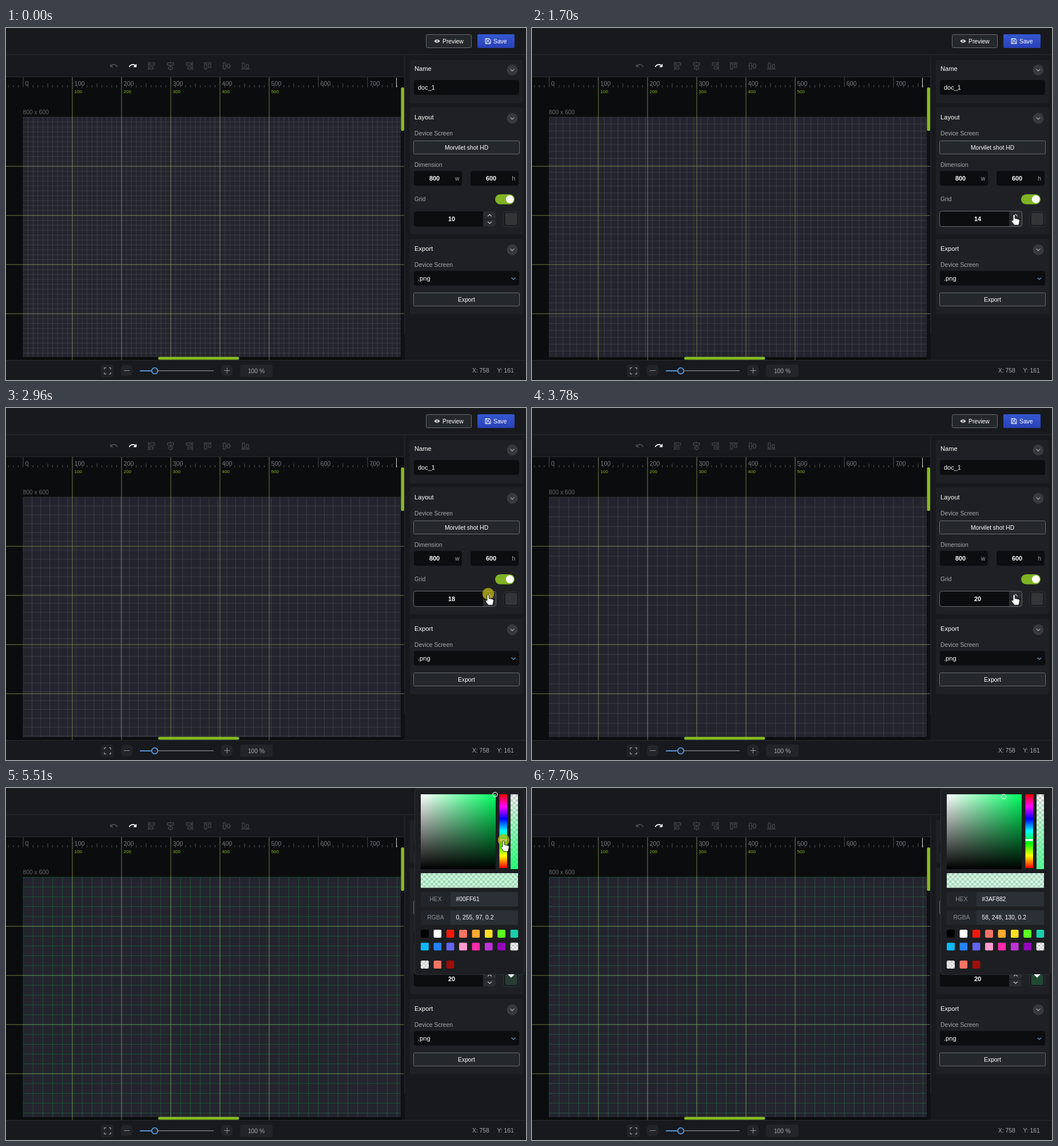
Write an HTML page with a canvas that moves like this. It is 909 px wide and 616 px high and loops after 8 s.

```html
<!DOCTYPE html>
<html lang="en">
<head>
<meta charset="utf-8">
<title>Grid settings</title>
<style>
html, body { margin: 0; width: 100%; height: 100%; overflow: hidden; background: #18191d; }
canvas { display: block; }
</style>
</head>
<body>
<canvas id="stage" width="909" height="616"></canvas>
<script>
const c = document.getElementById('stage').getContext('2d');
const LOOP = 8000, FONT = '"Liberation Sans", Arial, sans-serif';
const LIME = '#86bb22', EDGE = '#696c6f', FIELD = '#0c0d0e', GUIDE = '#707848';
const UNIT = 0.86, LEFT = 30, TOP = 156, WIDTH = 660, HEIGHT = 420;

// Timeline (ms)
const steps = [1100, 1300, 1500, 1700, 1900, 2100, 2430, 2640, 3110, 3780];
const presses = [960, 1240, 1430, 1560, 1760, 1960, 2290, 2500, 2960, 3710];
const OPEN = 4400, HUE_PICK = 5380, SHADE_PICK = 6050;
const pointerKeys = [[70, 852, 541], [470, 843, 325], [3800, 843, 325], [4250, 879, 331],
  [4620, 879, 331], [5300, 870, 91], [5720, 870, 91], [6050, 836, 32]];
const shadeKeys = [[6050, .85, .84], [6450, .6, .74], [6940, .64, .87], [7300, .72, 1], [7700, .766, .973]];

const clamp = v => Math.max(0, Math.min(1, v));
const mix = (a, b, k) => a + (b - a) * k;
const rgba = (col, a = 1) => `rgba(${col.map(Math.round)},${a})`;

function along(keys, t) {
  let i = 0;
  while (i < keys.length - 2 && t >= keys[i + 1][0]) i++;
  const a = keys[i], b = keys[i + 1];
  const k = clamp((t - a[0]) / (b[0] - a[0])), e = k * k * (3 - 2 * k);
  return [mix(a[1], b[1], e), mix(a[2], b[2], e)];
}

function rect(x, y, w, h, fill) { c.fillStyle = fill; c.fillRect(x, y, w, h); }

function box(x, y, w, h, r, fill, stroke) {
  c.beginPath();
  c.roundRect(x, y, w, h, r);
  if (fill) { c.fillStyle = fill; c.fill(); }
  if (stroke) { c.strokeStyle = stroke; c.lineWidth = 1; c.stroke(); }
}

function disc(x, y, r, fill, stroke, width = 1) {
  c.beginPath();
  c.arc(x, y, r, 0, 7);
  if (fill) { c.fillStyle = fill; c.fill(); }
  if (stroke) { c.strokeStyle = stroke; c.lineWidth = width; c.stroke(); }
}

function icon(d, x, y, stroke, fill, width = 1) {
  const p = new Path2D(d);
  c.save();
  c.translate(x, y);
  if (fill) { c.fillStyle = fill; c.fill(p); }
  if (stroke) { c.strokeStyle = stroke; c.lineWidth = width; c.stroke(p); }
  c.restore();
}

// y is the middle of the capitals
function text(s, x, y, color, size = 10.32, align = 'left', weight = '') {
  c.font = `${weight} ${size}px ${FONT}`;
  c.textAlign = align;
  c.fillStyle = color;
  c.fillText(s, x, y + size * .36);
}

function gradient(x0, y0, x1, y1, colors) {
  const g = c.createLinearGradient(x0, y0, x1, y1);
  colors.forEach((col, i) => g.addColorStop(i / (colors.length - 1), col));
  return g;
}

function checker(x, y, w, h, size) {
  rect(x, y, w, h, '#fff');
  c.fillStyle = '#c9c9c9';
  for (let j = 0; j * size < h; j++)
    for (let i = j % 2; i * size < w; i += 2)
      c.fillRect(x + i * size, y + j * size, Math.min(size, w - i * size), Math.min(size, h - j * size));
}

const chevron = (x, y, color, up = 1) => icon(`M-3.5 ${-1.7 * up}L0 ${1.7 * up}L3.5 ${-1.7 * up}`, x, y, color, null, 1.1);

function drawWorkspace(size, color) {
  rect(0, 86, 697, 495, '#0b0c0d');
  rect(690, 104, 7, 477, '#101112');
  rect(LEFT, TOP, WIDTH, HEIGHT, '#24242e');
  text('800 x 600', 29.5, 147.5, '#66686c');

  for (let n = 1; n < 6; n++) {
    const d = 86 * n;
    rect(LEFT + d - .5, 86, 1, 495, GUIDE);
    if (n < 5) rect(0, TOP + d - .5, 696, 1, GUIDE);
    text(100 * n, LEFT + d + 3.5, 111.5, LIME, 8);
  }

  c.fillStyle = rgba(color, .2);
  const gap = size * UNIT;
  for (let x = 0; x < WIDTH; x += gap) c.fillRect(LEFT + x - .5, TOP, 1, HEIGHT);
  for (let y = 0; y < HEIGHT; y += gap) c.fillRect(LEFT, TOP + y - .5, WIDTH, 1);

  for (let n = -3; n <= 76; n++) {
    const x = LEFT + n * 8.6 - .5, h = n % 10 ? (n % 5 ? 4 : 7) : 18;
    rect(x, 104 - h, 1, h, n % 10 ? '#505256' : '#484a4e');
    if (n >= 0 && n % 10 == 0) text(n * 10, x + 4, 97, '#77797d', 10.7);
  }
  rect(0, 85, 697, 1, '#292b30');
  rect(682, 87, 1, 17, '#d4d4d4');
  box(690.5, 104, 5.5, 76, 2, LIME);
  box(266, 575.5, 141.5, 5, 2.5, LIME);
}

function drawBars() {
  rect(0, 46, 909, 1, '#292b30');
  box(734.5, 11.5, 79, 23, 2, '#25282b', EDGE);
  icon('M-5 0Q0-6 5 0Q0 6-5 0Z', 753.5, 23, null, '#fff');
  disc(753.5, 23, 1.9, '#25282b');
  disc(753.5, 23, .9, '#fff');
  text('Preview', 763, 23, '#fff');
  box(824, 11, 65, 24, 2, gradient(0, 11, 0, 35, ['#3458d0', '#2a40b6']));
  icon('M-4.5-4.5H2.5L4.5-2.5V4.5H-4.5ZM-2.5-4.5V-1.5H1.8V-4.5M-2.5 4.5V1H2.5V4.5', 842.5, 23, '#fff');
  text('Save', 852, 23, '#fff');

  const gray = '#505358';
  [[188.5, 1, '#484b50'], [221.5, -1, '#fff']].forEach(([x, flip, color]) => {
    c.save();
    c.translate(x, 65.5);
    c.scale(flip, 1);
    icon('M-6.7-3V3H-.8Z', 0, 0, null, color);
    icon('M-4.6 .4C-1.5-3 4.6-1.8 6 2.8', 0, 0, color, null, 1.6);
    c.restore();
  });
  const sides = 'M-5.5-7.5V7.5M-3.5-5.5H5.5V-1.5H-3.5ZM-3.5 1.5H2.5V5.5H-3.5Z';
  const middle = 'M0-7.5V-5.5M0-1.5V1.5M0 5.5V7.5M-5.5-5.5H5.5V-1.5H-5.5ZM-3.5 1.5H3.5V5.5H-3.5Z';
  [[254, 0, 0, 1], [287, 1, 0, 1], [320, 0, 0, -1], [352, 0, 1, 1], [385, 1, 1, 1], [418, 0, 1, -1]]
    .forEach(([x, centered, turn, flip]) => {
      c.save();
      c.translate(x + .5, 66.5);
      if (turn) c.transform(0, 1, 1, 0, 0, 0);
      c.scale(flip, 1);
      icon(centered ? middle : sides, 0, 0, gray);
      c.restore();
    });

  rect(0, 581, 909, 1, '#292b30');
  box(166, 589, 22, 22, 3, '#202226');
  icon('M-5.5-2.5V-5.5H-2.5M2.5-5.5H5.5V-2.5M5.5 2.5V5.5H2.5M-2.5 5.5H-5.5V2.5', 177.5, 600, '#a4a6aa', null, 1.2);
  box(201, 589.5, 20, 20, 6, '#222428');
  box(376, 589.5, 20, 20, 6, '#222428');
  icon('M-5 0H5', 211, 599.5, '#96989c');
  icon('M-5 0H5M0-5V5', 386.5, 599.5, '#96989c');
  rect(234, 599, 26, 2, '#5794d6');
  rect(260, 599, 103, 1.5, '#74777b');
  disc(260, 600, 5.3, '#202329', '#5794d6', 1.8);
  box(409.5, 589, 56.5, 21.5, 3, '#222428');
  text('100 %', 437.5, 600, '#a9abaf', 10.32, 'center');
  text('X: 758', 815, 599, '#a9abaf');
  text('Y: 161', 858.5, 599, '#a9abaf');
}

function card(title, y, h, titleY) {
  box(706, y, 198, h, 4, '#1f2023');
  text(title, 714, titleY, '#fff', 11.18);
  disc(885, titleY + 2.5, 9.5, '#37393d');
  chevron(885, titleY + 2.5, '#a9abaf');
}

function button(label, y) {
  box(712.5, y, 185, 23, 2, '#25282b', EDGE);
  text(label, 805, y + 11.5, '#fff', 10.32, 'center');
}

function drawPanel(size, hover, swatch) {
  const label = '#a6a8ab';
  rect(696, 48, 2, 487, '#1f202b');
  card('Name', 56, 76, 71);
  box(713, 91, 184, 26, 4, FIELD);
  text('doc_1', 720, 104, '#fff', 11);

  card('Layout', 139, 222, 155.5);
  text('Device Screen', 714, 184, label);
  button('Morvilet shot HD', 197.5);
  text('Dimension', 714, 239, label);
  box(713, 250, 84, 26, 4, FIELD);
  box(812, 250, 84, 26, 4, FIELD);
  text('800', 749, 263, '#fff', 10.9, 'center', 'bold');
  text('600', 848, 263, '#fff', 10.9, 'center', 'bold');
  text('w', 785, 263.5, label);
  text('h', 884.5, 263, label);
  text('Grid', 714, 299, label);
  box(855, 291, 34, 17.5, 8.75, '#7fb324');
  disc(880.7, 299.7, 6.9, '#fff');

  box(713, 321, 143, 26.5, 4, FIELD);
  box(834, 321, 22, 13, [0, 4, 0, 0], '#2a2c2f');
  box(834, 334.7, 22, 12.8, [0, 0, 4, 0], '#2a2c2f');
  chevron(845.5, 328, '#d0d2d4', -1);
  chevron(845.5, 340.5, '#d0d2d4');
  if (hover) box(712.5, 320.5, 144, 27, 4, null, EDGE);
  text(size, 779, 334.5, '#fff', 11, 'center', 'bold');
  box(869.5, 321.5, 27, 26, 4, '#1b1c1f', '#303236');
  box(873, 323.5, 20.5, 21, 3, rgba(swatch, .2));

  card('Export', 369, 132, 385.5);
  text('Device Screen', 714, 414, label);
  box(713, 425, 184, 25.5, 4, FIELD);
  text('.png', 720, 438, '#fff', 11.18);
  chevron(887, 438.5, '#6aa5e0');
  button('Export', 463.5);
}

const palette = ['#000', '#fff', '#f5190b', '#f47564', '#ffab30', '#ffde24', '#5dff1f', '#18cfad',
  '#0cb8f5', '#2483f5', '#6462f0', '#ff9bcf', '#ff2ba9', '#be33d8', '#9207b8', null,
  null, '#f47564', '#9d0f0a'];

function drawPicker(color, s, v, picked) {
  box(714.5, 1.5, 192, 325, 3, '#1c1e21', '#2e3034');

  rect(725, 11, 131, 131, picked ? '#00ff61' : '#777');
  rect(725, 11, 131, 131, gradient(725, 0, 856, 0, ['#fff', 'rgba(255,255,255,0)']));
  rect(725, 11, 131, 131, gradient(0, 11, 0, 142, ['rgba(0,0,0,0)', '#000']));
  disc(725 + s * 130, 11.5 + (1 - v) * 130, 4, null, '#fff', 1.2);

  rect(862.5, 11, 13.5, 129, gradient(0, 11, 0, 140, ['#f00', '#f0f', '#00f', '#0ff', '#0f0', '#ff0', '#f00']));
  rect(862.5, picked ? 89.5 : 140, 13.5, 3, '#fff');
  checker(882, 11, 13, 131, 4.3);
  rect(882, 11, 13, 131, gradient(0, 11, 0, 142, [rgba(color, 0), rgba(color, .85)]));
  checker(725, 149, 170, 25.5, 4.3);
  rect(725, 149, 170, 25.5, rgba(color, .2));

  const hex = '#' + color.map(n => n.toString(16).padStart(2, '0')).join('').toUpperCase();
  [['HEX', hex, 182], ['RGBA', [...color, .2].join(', '), 214]].forEach(([name, value, y]) => {
    rect(725, y, 52, 25.5, '#22252a');
    rect(777, y, 118, 25.5, '#2b2f36');
    text(name, 751, y + 12.5, '#8d9095', 10.32, 'center');
    text(value, 786.5, y + 12.5, '#fff');
  });

  palette.forEach((fill, i) => {
    const x = 725 + i % 8 * 22.35, y = [248, 270.5, 302][i >> 3];
    c.save();
    c.beginPath();
    c.roundRect(x, y, 14, 14, 2.5);
    c.clip();
    if (fill) rect(x, y, 14, 14, fill);
    else checker(x, y, 14, 14, 3.5);
    c.restore();
  });
  icon('M-6 0H6L0 6Z', 883, 326, null, '#fff');
}

const HAND = 'M-2 11V2.2a1.6 1.6 0 0 1 3.2 0V7.2L7.6 8.6Q9.6 9.2 9.4 11.2L8.6 15.5L7.6 19H.4L-4.6 13Q-5.4 11.4-3.9 10.6Q-2.8 10.3-2 11Z';
const ARROW = 'M0 0V15L3.6 11.7L6 17L8.3 16L6 10.8H10.8Z';

function drawPointer(t) {
  if (t < 70 || t > 6100) return;
  const [x, y] = along(pointerKeys, t);
  const i = steps.findIndex(s => t < s);
  const pressed = i >= 0 && t >= presses[i] || t >= 4320 && t < 4390 || t >= 5330 && t < 5650;
  if (pressed) disc(x, y, 10.3, 'rgba(190,180,20,.75)');
  const hand = t > 400 && (t < 3900 || t > 4080);
  icon(hand ? HAND : ARROW, x, y + 1, '#111', '#fff', .9);
}

function colorAt(s, v) {
  const max = v * 255, min = max * (1 - s);
  return [min, max, mix(min, max, 97 / 255)].map(Math.round);
}

function draw(t) {
  const size = 10 + steps.filter(s => t >= s).length;
  const picked = t >= HUE_PICK, shaded = t >= SHADE_PICK;
  const gray = [153, 153, 153], green = [0, 255, 97], mint = [58, 248, 130];
  const [s, v] = shaded ? along(shadeKeys, t) : picked ? [1, 1] : [0, .6];
  const color = picked ? colorAt(s, v) : gray;
  const gridColor = shaded ? mint : picked ? green : gray;
  const k = clamp((t - HUE_PICK) / 300);
  const swatch = shaded ? mint : gray.map((g, i) => mix(g, green[i], k));

  rect(0, 0, 909, 616, '#18191d');
  drawWorkspace(size, gridColor);
  drawBars();
  drawPanel(size, t > 420 && t < 3860, swatch);
  const fade = clamp((t - OPEN) / 200);
  if (fade) {
    // Fade the picker as one layer: its parts must not show through each other
    c.globalAlpha = fade;
    drawPicker(color, s, v, picked);
    c.globalAlpha = 1;
  }
  drawPointer(t);
}

function frame(now) {
  draw(now % LOOP);
  requestAnimationFrame(frame);
}
requestAnimationFrame(frame);
</script>
</body>
</html>
```
